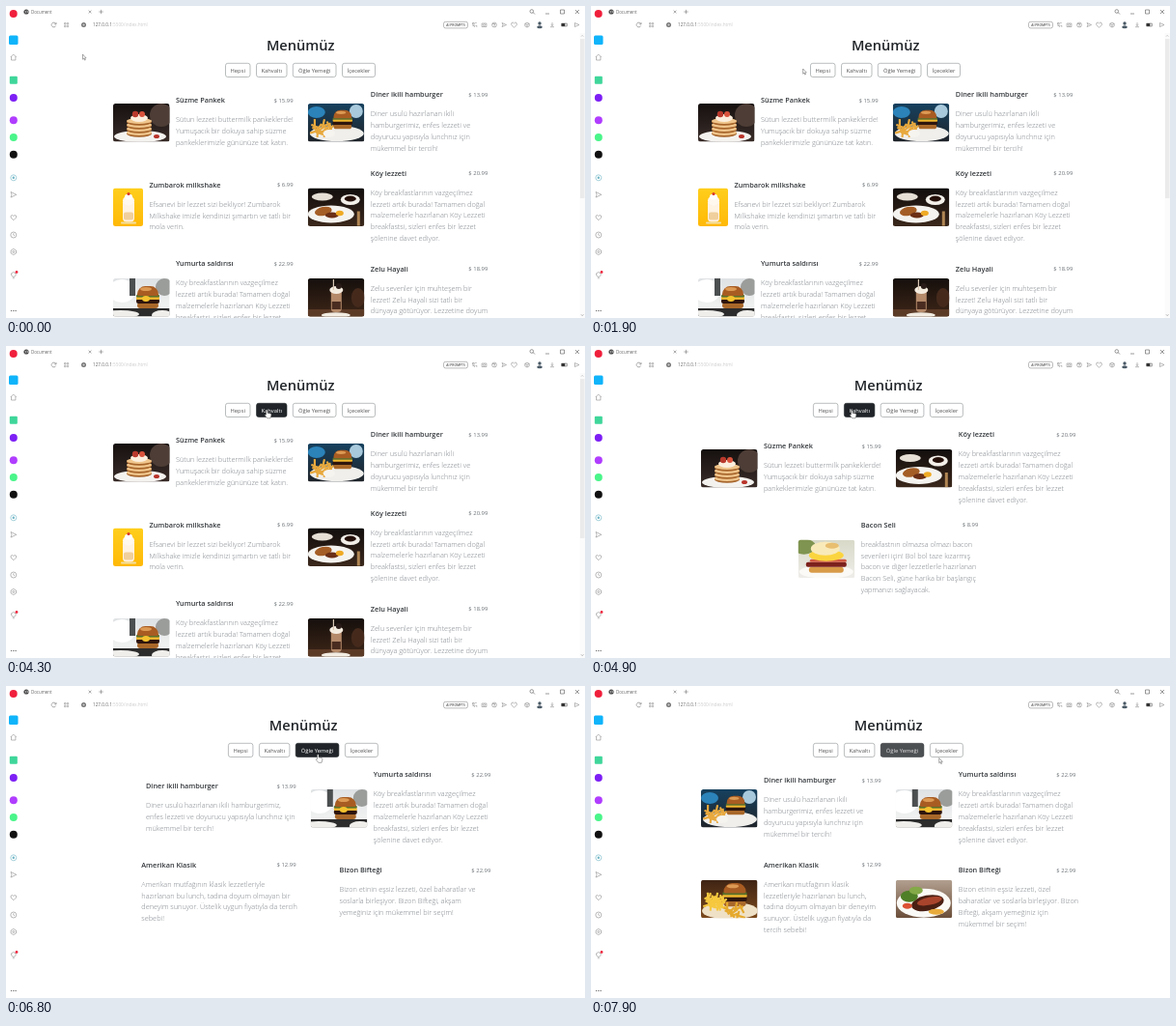
An HTML page with a canvas for the animation above (8000 ms loop, 600 by 323 pixels).

```html
<!DOCTYPE html>
<html lang="tr">
<head>
<meta charset="utf-8">
<title>Menü</title>
<style>
  html, body { margin: 0; width: 100%; height: 100%; overflow: hidden; background: #fff; }
  canvas { display: block; width: 600px; height: 323px; }
</style>
</head>
<body>
<canvas id="stage"></canvas>
<script>
const LOOP = 8000, STEP = 100, INK = '#212529';
const canvas = document.getElementById('stage');
const ctx = canvas.getContext('2d');
const dpr = window.devicePixelRatio || 1;
canvas.width = 600 * dpr;
canvas.height = 323 * dpr;

// ---------- drawing helpers ----------
function text(str, x, y, size, color = INK, weight = 400, align = 'left') {
  ctx.font = `${weight} ${size}px "Open Sans", "Noto Sans", sans-serif`;
  ctx.fillStyle = color;
  ctx.textAlign = align;
  ctx.fillText(str, x, y);
}
function oval(color, x, y, rx, ry = rx, turn = 0) {
  ctx.fillStyle = color;
  ctx.beginPath();
  ctx.ellipse(x, y, rx, ry, turn, 0, 7);
  ctx.fill();
}
function box(color, x, y, w, h, r = 0) {
  ctx.fillStyle = color;
  ctx.beginPath();
  ctx.roundRect(x, y, w, h, r);
  ctx.fill();
}
function shade(top, bottom, w = 58.5) {
  const g = ctx.createLinearGradient(0, 0, 0, 39.5);
  g.addColorStop(0, top);
  g.addColorStop(1, bottom);
  box(g, 0, 0, w, 39.5);
}
function icon(x, y, d, color = '#8a8a8a', width = 0.6) {
  ctx.save();
  ctx.translate(x, y);
  ctx.strokeStyle = color;
  ctx.lineWidth = width;
  ctx.stroke(new Path2D(d));
  ctx.restore();
}

// ---------- food pictures, 58.5 x 39.5 unless noted ----------
function burger(x, y, s) {
  ctx.save();
  ctx.translate(x, y);
  ctx.scale(s, s);
  box('#a9682a', -11, 5, 22, 6, 3);
  box('#2e150d', -12, 1, 24, 5, 2);
  box('#f0b62e', -12, -1, 24, 3, 1);
  box('#56702a', -12, -3, 24, 2.5, 1);
  box('#a85c22', -11, -12, 22, 10, [10, 10, 2, 2]);
  oval('#dc9a55', -2, -9, 6, 2);
  ctx.restore();
}
function fries(x, y, n, color) {
  for (let i = 0; i < n; i++) {
    ctx.save();
    ctx.translate(x + (i * 7) % 17, y + (i * 5) % 11);
    ctx.rotate(Math.sin(i * 2.3) * 1.3);
    box(color, -1, -5, 2.2, 10, 0.6);
    ctx.restore();
  }
}
const photos = {
  pancake() {
    shade('#15100f', '#3a2d29');
    oval('#4d3d36', 50, 12, 12, 12);
    oval('#f4f2ef', 28, 34, 27, 6);
    [31, 27, 23, 19].forEach(y => {
      oval('#a8662c', 27, y, 13, 3.8);
      oval('#efc58c', 27, y - 1, 13, 3);
    });
    oval('#fbeedd', 27, 15, 9, 4);
    oval('#b8392c', 23, 11, 3.2);
    oval('#d9533c', 30, 11, 3);
    oval('#b93329', 45, 34, 3, 2);
  },
  diner() {
    shade('#16415f', '#20242a');
    oval('#2b83ba', 9, 9, 9, 6);
    oval('#a8c9dc', 50, 8, 7, 7);
    oval('#f0efec', 30, 31, 28, 8);
    fries(7, 21, 18, '#e8a93e');
    burger(36, 17, 0.85);
    oval('#f6f4ef', 22, 31, 6, 4);
  },
  shake() {
    shade('#ffce1c', '#ffb908', 31);
    box('#fff3e4', 10, 14, 12, 21, [1, 1, 4, 4]);
    box('#f0cf9d', 11, 25, 10, 8, 2);
    oval('#fff8ef', 16, 13, 6, 5);
    oval('#fff', 16, 9, 4, 3);
    oval('#d93628', 16, 6, 1.6);
    box('#f3dfa5', 8, 35, 16, 2, 1);
  },
  village() {
    shade('#120e0d', '#3b281c');
    oval('#f5f3ef', 24, 27, 24, 9);
    oval('#a45d25', 16, 24, 9, 4.5, -0.2);
    oval('#6b2f16', 25, 28, 7, 3);
    oval('#efaa24', 33, 26, 4, 2.8);
    oval('#f3efe9', 44, 12, 10, 5.5);
    oval('#251009', 44, 11, 6, 3);
    oval('#e5dfd5', 15, 9, 11, 4);
    box('#b08653', 51, 24, 3, 15);
  },
  egg() {
    shade('#dfe2e4', '#f6f6f5');
    oval('#fff', 9, 13, 14, 12);
    box('#4c4f50', 17, 0, 6, 18);
    oval('#9b9d9b', 53, 9, 9, 9);
    box('#2c2c2c', 0, 31, 58.5, 8.5);
    oval('#efeeeb', 8, 37, 19, 4);
    oval('#efeeeb', 51, 38, 11, 5);
    burger(36, 20, 1);
    oval('#f4c22e', 34, 21, 4, 3);
  },
  cookie() {
    shade('#150f0c', '#3e2618');
    box('#5b3a26', 0, 32, 58.5, 8);
    oval('#452a1c', 52, 20, 7, 10);
    box('#b48a6a', 24, 13, 11, 22, [1, 1, 4, 4]);
    box('#4a2c20', 25, 24, 9, 8);
    oval('#f4ebdf', 29.5, 12, 7, 4);
    oval('#2a1d19', 32, 8, 3);
    box('#d9c7b4', 26, 1, 1.2, 11);
    oval('#f2ece2', 29, 38, 15, 2.8);
  },
  bacon() {
    shade('#d8d9c8', '#efede9');
    oval('#7f9450', 6, 7, 12, 8);
    oval('#fbfaf7', 29, 33, 28, 7);
    box('#d89b48', 11, 28, 36, 6, 3);
    box('#7c211d', 8, 23, 42, 5, 2);
    box('#d05a43', 12, 20, 38, 3, 2);
    oval('#fbd53f', 29, 16, 18, 6);
    oval('#f9eaba', 28, 9, 15, 7);
    oval('#e8be70', 35, 6, 7, 3);
  },
  classic() {
    shade('#3f2414', '#7c4a1d');
    oval('#efe1c6', 30, 32, 29, 9);
    burger(35, 16, 1.05);
    fries(7, 18, 28, '#f6c83e');
    fries(27, 28, 12, '#e5a92e');
  },
  steak() {
    shade('#b3a090', '#6b4e3a');
    oval('#fbf9f5', 29, 24, 28, 15);
    oval('#4a1f13', 33, 24, 17, 8, -0.2);
    oval('#a9442c', 35, 22, 13, 4, -0.2);
    oval('#4f7f27', 14, 17, 9, 6);
    oval('#84a947', 21, 11, 7, 4);
    oval('#dc5133', 12, 27, 5, 3);
    oval('#e8ab3c', 42, 33, 8, 3);
  }
};

const VILLAGE_TEXT = 'Köy breakfastlarının vazgeçilmez|lezzeti artık burada! Tamamen doğal|malzemelerle hazırlanan Köy Lezzeti|breakfastsi, sizleri enfes bir lezzet|şölenine davet ediyor.';
const dishes = {
  pancake: ['Süzme Pankek', '15.99', 'Sütun lezzeti buttermilk pankeklerde!|Yumuşacık bir dokuya sahip süzme|pankeklerimizle gününüze tat katın.'],
  diner: ['Diner ikili hamburger', '13.99', 'Diner usulü hazırlanan ikili|hamburgerimiz, enfes lezzeti ve|doyurucu yapısıyla lunchnız için|mükemmel bir tercih!',
    'Diner usulü hazırlanan ikili hamburgerimiz,|enfes lezzeti ve doyurucu yapısıyla lunchnız için|mükemmel bir tercih!'],
  shake: ['Zumbarok milkshake', '6.99', 'Efsanevi bir lezzet sizi bekliyor! Zumbarok|Milkshake imizle kendinizi şımartın ve tatlı bir|mola verin.'],
  village: ['Köy lezzeti', '20.99', VILLAGE_TEXT],
  egg: ['Yumurta saldırısı', '22.99', VILLAGE_TEXT],
  cookie: ['Zelu Hayali', '18.99', 'Zelu sevenler için muhteşem bir|lezzet! Zelu Hayali sizi tatlı bir|dünyaya götürüyor. Lezzetine doyum'],
  bacon: ['Bacon Seli', '8.99', 'breakfastnın olmazsa olmazı bacon|sevenleri için! Bol bol taze kızarmış|bacon ve diğer lezzetlerle hazırlanan|Bacon Seli, güne harika bir başlangıç|yapmanızı sağlayacak.'],
  classic: ['Amerikan Klasik', '12.99', 'Amerikan mutfağının klasik|lezzetleriyle hazırlanan bu lunch,|tadına doyum olmayan bir deneyim|sunuyor. Üstelik uygun fiyatıyla da|tercih sebebi!',
    'Amerikan mutfağının klasik lezzetleriyle|hazırlanan bu lunch, tadına doyum olmayan bir|deneyim sunuyor. Üstelik uygun fiyatıyla da tercih|sebebi!'],
  steak: ['Bizon Bifteği', '22.99', 'Bizon etinin eşsiz lezzeti, özel|baharatlar ve soslarla birleşiyor. Bizon|Bifteği, akşam yemeğiniz için|mükemmel bir seçim!',
    'Bizon etinin eşsiz lezzeti, özel baharatlar ve|soslarla birleşiyor. Bizon Bifteği, akşam|yemeğiniz için mükemmel bir seçim!']
};

// Each entry: dish, column x, title centre y, picture y, text x while the picture is missing
const pages = {
  all: [['pancake', 111, 97.5, 101], ['diner', 312.8, 91.5, 101], ['shake', 111, 185, 188.5],
    ['village', 312.8, 173, 188.5], ['egg', 111, 266.5, 282], ['cookie', 312.8, 272, 282]],
  breakfast: [['pancake', 114, 103.5, 107], ['village', 315.8, 91.5, 107], ['bacon', 214.8, 185, 200.7]],
  lunchLoading: [['diner', 114, 103.5, 107, 145], ['egg', 315.8, 91.5, 107],
    ['classic', 114, 185, 200.7, 140.3], ['steak', 315.8, 190.5, 200.7, 345.6]],
  lunch: [['diner', 114, 97.5, 107], ['egg', 315.8, 91.5, 107],
    ['classic', 114, 185, 200.7], ['steak', 315.8, 190.5, 200.7]]
};

function drawDish([key, x, y, photoY, bareX]) {
  const [title, price, copy, wideCopy] = dishes[key];
  const width = key === 'shake' ? 31 : 58.5;
  const left = bareX || x + width + 6.5;
  if (!bareX) {
    ctx.save();
    ctx.translate(x, photoY);
    ctx.beginPath();
    ctx.roundRect(0, 0, width, 39.5, 2.5);
    ctx.clip();
    photos[key]();
    ctx.restore();
  }
  text(title, left, y + 2.6, 7.3, '#33373b', 600);
  text('$ ' + price, x + 186.5, y + 2.1, 5.9, '#6a7075', 400, 'right');
  (bareX ? wideCopy : copy).split('|').forEach((line, i) =>
    text(line, left, y + 22.6 + i * 11.9, 7.35, '#7b8187', 300));
}

// ---------- browser frame ----------
const GLOBE = 'M-2.4 0A2.4 2.4 0 1 0 2.4 0A2.4 2.4 0 1 0 -2.4 0M-2 -1H1L0 1L1 2';
const SQUARE = 'M-2 -2H2V2H-2Z', CROSS = 'M-2 -2L2 2M2 -2L-2 2';
const HEART = 'M0 2.8L-2.8 0Q-3.2 -2.6 -1.2 -2.5L0 -1.5L1.2 -2.5Q3.2 -2.6 2.8 0Z';
const PLANE = 'M-2.8 -2.8L3 0L-2.8 2.8L-1.8 0Z';
const RING = 'M-3 0A3 3 0 1 0 3 0A3 3 0 1 0 -3 0';

function drawBrowser() {
  oval('#f0203c', 7.7, 8, 4);
  oval('#444', 21, 6, 2.6);
  icon(21, 6, 'M-1.5 -1L0 0L-1 1.5M1 -1.5L1.5 1', '#fff');
  text('Document', 26, 7.7, 4.4, '#666');
  icon(87, 6, 'M-1.4 -1.4L1.4 1.4M1.4 -1.4L-1.4 1.4', '#777');
  icon(98.5, 6, 'M-2.2 0H2.2M0 -2.2V2.2', '#777');
  icon(545, 5.5, 'M-2 0A1.8 1.8 0 1 0 1.6 0A1.8 1.8 0 1 0 -2 0M1.2 1.2L3 3', '#555');
  icon(561, 8, 'M-2 0H2', '#555');
  icon(576.5, 6, SQUARE, '#555');
  icon(592, 6, CROSS, '#555');

  icon(49.5, 19.5, 'M2.2 -1A2.4 2.4 0 1 0 2.2 1M2.5 -2.5V-.6H.6', '#777');
  icon(62.5, 19.5, 'M-2 -2H-.5V-.5H-2ZM.7 -2H2.2V-.5H.7ZM-2 .7H-.5V2.2H-2ZM.7 .7H2.2V2.2H.7Z', '#999');
  oval('#777', 80.5, 19.5, 2.5);
  icon(80.5, 19.5, 'M-1.5 0H1.5M0 -1.5V1.5', '#ddd', 0.5);
  text('127.0.0.1', 90, 21.3, 4.7, '#666');
  text(':5500/index.html', 109.8, 21.3, 4.7, '#ccc');
  ctx.strokeStyle = '#777';
  ctx.lineWidth = 0.5;
  ctx.beginPath();
  ctx.roundRect(453.5, 16.3, 25, 6.6, 2);
  ctx.stroke();
  text('AI PROMPTS', 466, 20.8, 3.3, '#555', 600, 'center');
  icon(485.5, 19.5, 'M-2 -2H-.3V-.3H-2ZM.7 -2H2.2M-2 1H0V2.3M1 .7H2.3V2.3');
  icon(495.5, 19.5, 'M-2.4 -1.5H2.4V2H-2.4ZM-1 .2A1 1 0 1 0 1 .2A1 1 0 1 0 -1 .2');
  icon(506, 19.5, GLOBE);
  icon(516, 19.5, 'M-2 -2L2.5 0L-2 2L-1 0Z');
  icon(526.5, 19.5, HEART);
  icon(540, 19.5, 'M0 -2.4L2.2 -1.2V1.3L0 2.5L-2.2 1.3V-1.2ZM-2.2 -1.2L0 0L2.2 -1.2M0 0V2.5');
  oval('#4a5a66', 553, 18, 1.7);
  oval('#4a5a66', 553, 21.8, 2.8, 1.5);
  icon(566, 19.5, 'M0 -2.4V1M-1.3 -.2L0 1L1.3 -.2M-2 2.2H2');
  icon(578.5, 19.5, 'M-2.8 -1.4H2.8V1.4H-2.8Z', '#555');
  box('#333', 575.7, 18.1, 3.6, 2.8, 0.5);
  icon(591.5, 19.5, 'M-2 -2L2.5 0L-2 2Z');

  box('#0fb4fa', 3, 30.5, 9.5, 9.5, 1.5);
  icon(7.7, 53, 'M-3 0L0 -3L3 0M-2.2 -.7V3H2.2V-.7');
  box('#3fd69a', 3.8, 72.8, 8, 8, 1);
  oval('#7d1ff5', 7.8, 95, 4);
  oval('#b03dff', 7.8, 118.3, 4);
  oval('#4af58a', 7.8, 136, 4);
  oval('#111', 7.8, 153.8, 4);
  icon(7.8, 177.8, RING, '#6db4c4');
  oval('#6db4c4', 7.8, 177.8, 1.2);
  icon(7.8, 195.3, PLANE);
  icon(7.8, 219, HEART);
  icon(7.8, 237, RING + 'M0 -1.7V0L1.3 1');
  icon(7.8, 254.5, 'M0 -3.1L2.7 -1.5V1.5L0 3.1L-2.7 1.5V-1.5ZM-1 0A1 1 0 1 0 1 0A1 1 0 1 0 -1 0');
  icon(7.8, 278.3, 'M-1 2Q-3 0 -2.3 -1.5Q0 -4 2.3 -1.5Q3 0 1 2ZM-1 3.5H1');
  oval('#ee2940', 11, 275.5, 1.4);
  for (let i = 0; i < 3; i++) oval('#777', 5.5 + i * 2.3, 315.5, 0.7);
}

function drawScrollbar() {
  box('#fbfbfb', 594.5, 28, 5.5, 295);
  box('#ebebeb', 595, 34, 4.5, 165);
  icon(597.2, 31, 'M-1.2 .6L0 -.6L1.2 .6', '#aaa');
  icon(597.2, 320, 'M-1.2 -.6L0 .6L1.2 -.6', '#777');
}

// ---------- filter buttons and pointer ----------
const hovers = { Kahvaltı: [3370, 5480], 'Öğle Yemeği': [5530, 7870] };
const buttons = [['Hepsi', 227.5, 25.5], ['Kahvaltı', 259.5, 31.5], ['Öğle Yemeği', 297.3, 44.7], ['İçecekler', 348.5, 34]];
const clamp = v => Math.max(0, Math.min(1, v));
const mix = (a, b, k) => a + (b - a) * k;

function drawButton([label, x, width], shift, t) {
  const [from, to] = hovers[label] || [LOOP, LOOP];
  const dark = clamp((t - from) / 150) - clamp((t - to) / 150);
  ctx.beginPath();
  ctx.roundRect(x + shift, 59.3, width, 14.2, 2.3);
  ctx.fillStyle = `rgba(33,37,41,${dark})`;
  ctx.fill();
  ctx.strokeStyle = dark > 0.5 ? `rgba(33,37,41,${dark})` : '#8c9093';
  ctx.lineWidth = 0.6;
  ctx.stroke();
  const tone = Math.round(mix(85, 255, dark));
  text(label, x + shift + width / 2, 68.5, 5.8, `rgb(${tone},${tone},${tone})`, 400, 'center');
}

const path = [[0, 79.5, 50], [100, 81, 50], [700, 179.5, 69], [900, 214, 70], [1850, 214, 70], [2000, 231, 55],
  [2400, 231, 55], [2600, 231, 48], [2800, 231.5, 53], [3300, 233, 59], [3500, 269, 67], [3850, 269, 67],
  [4000, 269.5, 66], [5350, 269.5, 66], [5700, 322.5, 70.5], [7600, 322.5, 70.5], [7900, 360.7, 74.5], [LOOP, 361, 74.5]];

function drawPointer(t) {
  const i = path.findIndex(p => p[0] > t);
  const [t0, x0, y0] = path[i - 1], [t1, x1, y1] = path[i];
  const k = (t - t0) / (t1 - t0);
  const hand = Object.values(hovers).some(([from, to]) => t >= from && t < to);
  const shape = new Path2D(hand
    ? 'M0 .8Q.8 -.4 1.5 .8V3.3L4.8 4.1Q5.6 4.4 5.4 5.5L4.6 8.8H1.2L-1.2 5.8Q-1 4.7 0 5.2Z'
    : 'M0 0V5.2L1.2 4.2L2 6.1L2.8 5.8L2 3.9H3.6Z');
  ctx.save();
  ctx.translate(mix(x0, x1, k), mix(y0, y1, k));
  ctx.fillStyle = '#fff';
  ctx.strokeStyle = '#555';
  ctx.lineWidth = 0.5;
  ctx.fill(shape);
  ctx.stroke(shape);
  ctx.restore();
}

function pageAt(t) {
  if (t < 4400) return 'all';
  if (t < 6800) return 'breakfast';
  return t < 6900 ? 'lunchLoading' : 'lunch';
}

function frame(now) {
  const t = Math.floor((now % LOOP) / STEP) * STEP;
  const page = pageAt(t);
  const shift = page === 'all' ? 0 : 2.9;
  ctx.setTransform(dpr, 0, 0, dpr, 0, 0);
  box('#fff', 0, 0, 600, 323);
  drawBrowser();
  if (page === 'all') drawScrollbar();
  text('Menümüz', 305.2 + shift, 46.3, 14.6, INK, 600, 'center');
  buttons.forEach(b => drawButton(b, shift, t));
  pages[page].forEach(drawDish);
  drawPointer(t);
  requestAnimationFrame(frame);
}
requestAnimationFrame(frame);
</script>
</body>
</html>
```
